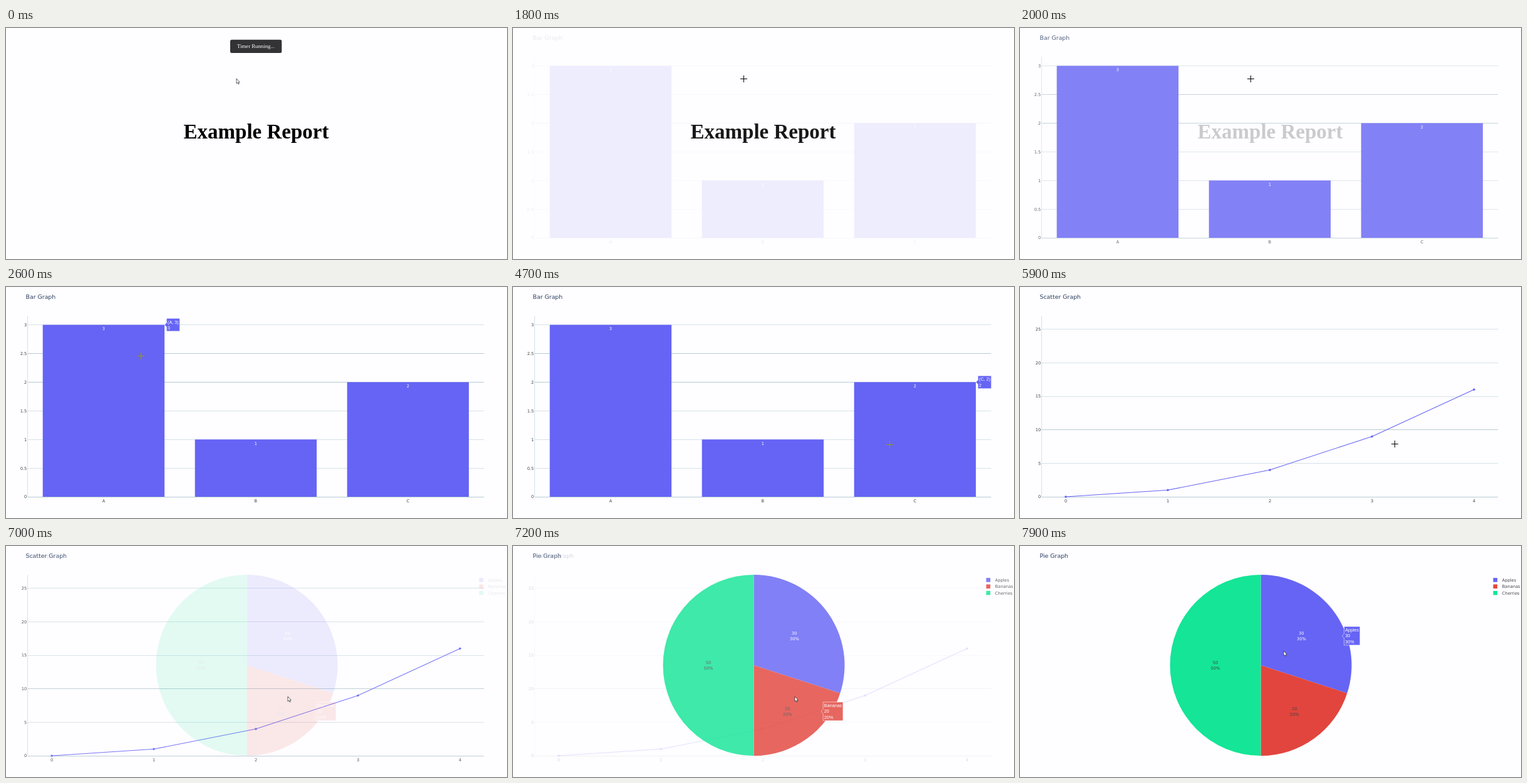
An HTML page for the animation above (8000 ms loop, 800 by 370 pixels).

```html
<!DOCTYPE html>
<html lang="en">
<head>
<meta charset="utf-8">
<title>Example Report</title>
<style>
  html, body { margin: 0; width: 100%; height: 100%; overflow: hidden; background: #fefdff; }
  svg { display: block; width: 100%; height: 100%; }
  .plot text { font: 6.65px "DejaVu Sans", sans-serif; fill: #444; }
  .plot .title { font-size: 9.4px; fill: #2a3f5f; }
  .plot .tip text { font: 7.2px Arial, "Liberation Sans", sans-serif; fill: #fff; }
  .tip path { stroke: #fff; stroke-width: .55; }
  .serif { font-family: "Liberation Serif", Times, serif; text-anchor: middle; }
  #cross { stroke: #fff; mix-blend-mode: difference; }
</style>
</head>
<body>
<svg viewBox="0 0 800 370">
  <rect width="800" height="370" fill="#fefdff"/>
  <g class="slide serif">
    <text x="399.5" y="177" font-size="33" font-weight="bold">Example Report</text>
  </g>
  <g class="slide plot"></g>
  <g class="slide plot"></g>
  <g class="slide plot"></g>
  <g id="timer" class="serif">
    <rect x="358" y="18.7" width="82.3" height="21.3" rx="2.5" fill="#333336"/>
    <text x="399" y="32.3" font-size="8.75" fill="#fff">Timer Running...</text>
  </g>
  <path id="arrow" d="M0 0V8L1.8 6.4L3 9L4.2 8.5L3.1 5.9H5.3Z" fill="#fff" stroke="#222" stroke-width=".7"/>
  <path id="cross" d="M-5.5 .5H5.5M0 -5V6" fill="none"/>
</svg>
<script>
const LOOP = 8000, FADE = 500;
const STARTS = [-FADE, 1750, 5345, 6945];
const BLUE = '#6664f4', RED = '#e2453d', GREEN = '#14e597';
const LEFT = 34.4, RIGHT = 763.4, TOP = 46, BASE = 336;
const CX = 384.5, CY = 191, R = 145;

// time, x, y
const PATH = [
  [0, 368, 81], [2200, 368, 81], [2550, 215, 110], [3150, 215, 110],
  [3650, 400, 290], [4050, 400, 290], [4600, 601, 252], [5850, 601, 252],
  [6150, 564, 241], [6500, 564, 241], [6800, 450, 241], [7350, 450, 241],
  [7800, 421, 168], [LOOP, 421, 168]
];

const bars = [['A', 3], ['B', 1], ['C', 2]].map(([name, v], i) => {
  const mid = LEFT + 243 * (i + .5);
  return { name, v, mid, x: mid - 97.2, y: BASE - 91.8 * v, w: 194.4 };
});

const points = [0, 1, 2, 3, 4].map(i => ({ i, x: 73 + 163 * i, y: BASE - 10.73 * i * i }));

let turn = 0;
const slices = [['Apples', 30, BLUE, '#fff'], ['Bananas', 20, RED, '#444'], ['Cherries', 50, GREEN, '#444']]
  .map(([name, v, color, ink]) => {
    const from = turn, to = turn += v / 100;
    const s = Math.sin(Math.PI * v / 100), inner = R * s / (1 + s);
    const [x, y] = onCircle((from + to) / 2, R - inner);
    return { name, v, color, ink, from, to, x, y, inner };
  });

function onCircle(part, r) {
  const a = part * 2 * Math.PI;
  return [CX + r * Math.sin(a), CY - r * Math.cos(a)];
}

const text = (s, x, y, anchor = 'middle', more = '') =>
  `<text x="${x}" y="${y}" text-anchor="${anchor}" ${more}>${s}</text>`;
const title = s => text(s, 31.5, 18.8, 'start', 'class="title"');
const line = (d, strong) => `<path d="${d}" stroke="${strong ? '#b7ccd6' : '#d5e3ea'}"/>`;

function axes(step, count, unit, strong) {
  let out = line(`M34.5 ${TOP}V${BASE}`);
  for (let i = 0; i <= count; i++) {
    const y = BASE - unit * step * i;
    out += line(`M${LEFT} ${Math.floor(y) + .5}H${RIGHT}`, strong.includes(i))
      + text(step * i, 33.2, y + 2.4, 'end');
  }
  return out;
}

function barPlot() {
  return title('Bar Graph') + axes(.5, 6, 91.8, [0, 4, 5]) + bars.map(b =>
    `<rect x="${b.x}" y="${b.y}" width="${b.w}" height="${BASE - b.y}" fill="${BLUE}"/>`
    + text(b.v, b.mid, b.y + 8.8, 'middle', 'style="fill:#fff"')
    + text(b.name, b.mid, 344.6)).join('');
}

function scatterPlot() {
  return title('Scatter Graph') + axes(5, 5, 10.73, [0, 2])
    + `<polyline points="${points.map(p => p.x + ',' + p.y).join(' ')}" fill="none" stroke="${BLUE}" stroke-width="1.1"/>`
    + points.map(p => `<circle cx="${p.x}" cy="${p.y}" r="1.8" fill="${BLUE}"/>` + text(p.i, p.x, 344.6)).join('');
}

function piePlot() {
  return title('Pie Graph') + slices.map((s, i) => {
    const ink = `style="fill:${s.ink}"`, y = 54.4 + 10.4 * i;
    return `<path d="M${CX} ${CY}L${onCircle(s.from, R)}A${R} ${R} 0 0 1 ${onCircle(s.to, R)}Z" fill="${s.color}"/>`
      + text(s.v, s.x, s.y - 2, 'middle', ink) + text(s.v + '%', s.x, s.y + 6.8, 'middle', ink)
      + `<rect x="755.6" y="${y - 3.3}" width="6.6" height="6.6" fill="${s.color}"/>`
      + text(s.name, 769.8, y + 2.5, 'start');
  }).join('');
}

// Tooltip contents for the pointer position, one rule per slide
const hovers = [
  () => null,
  (x, y) => {
    const b = bars.find(b => x > b.x && x < b.x + b.w && y > b.y && y < BASE);
    return b && { x: b.x + b.w, y: b.y, color: BLUE, lines: [`(${b.name}, ${b.v})`, b.v] };
  },
  (x, y) => {
    const p = points.find(p => Math.hypot(p.x - x, p.y - y) < 11);
    return p && { x: p.x + 2, y: p.y, color: BLUE, lines: [`(${p.i}, ${p.i * p.i})`] };
  },
  (x, y) => {
    if (Math.hypot(x - CX, y - CY) > R) return null;
    const part = (Math.atan2(x - CX, CY - y) / (2 * Math.PI) + 1) % 1;
    const s = slices.find(s => part < s.to);
    return { x: s.x + s.inner, y: s.y, color: s.color, lines: [s.name, s.v, s.v + '%'] };
  }
];

const slides = [...document.querySelectorAll('.slide')];
[barPlot, scatterPlot, piePlot].forEach((plot, i) => slides[i + 1].innerHTML = plot());
const tips = slides.map(s => {
  const g = document.createElementNS('http://www.w3.org/2000/svg', 'g');
  g.setAttribute('class', 'tip');
  return s.appendChild(g);
});
const timer = document.getElementById('timer');
const arrow = document.getElementById('arrow');
const cross = document.getElementById('cross');
const pen = document.createElement('canvas').getContext('2d');
pen.font = '7.2px Arial, "Liberation Sans", sans-serif';

function tooltip(h) {
  if (!h) return '';
  const w = Math.max(...h.lines.map(s => pen.measureText(s).width)) + 3.4;
  const n = h.lines.length, half = n * 4.68 + .9;
  return `<path d="M${h.x} ${h.y}l3.3 -3.3v${3.3 - half}h${w}v${2 * half}h${-w}v${3.3 - half}Z" fill="${h.color}"/>`
    + h.lines.map((s, i) => text(s, h.x + 5, h.y + (i - (n - 1) / 2) * 9.36 + 2.6, 'start')).join('');
}

const clamp = v => Math.min(1, Math.max(0, v));

// The standard CSS "ease" curve
function ease(x) {
  let lo = 0, hi = 1, s;
  for (let i = 0; i < 20; i++) {
    s = (lo + hi) / 2;
    if (.75 * s * (1 - s) + s ** 3 < x) lo = s; else hi = s;
  }
  return .3 * s * (1 - s) ** 2 + 3 * s * s * (1 - s) + s ** 3;
}

function pointer(t) {
  const i = PATH.findIndex(p => p[0] > t);
  const [t0, x0, y0] = PATH[i - 1], [t1, x1, y1] = PATH[i];
  let k = (t - t0) / (t1 - t0);
  k = k * k * (3 - 2 * k);
  return [x0 + (x1 - x0) * k, y0 + (y1 - y0) * k];
}

function draw(now) {
  const t = now % LOOP;
  const [x, y] = pointer(t);
  const active = STARTS.filter(s => s <= t).length - 1;
  const shown = ease(clamp((t - STARTS[active]) / FADE));
  slides.forEach((s, i) => {
    s.style.opacity = i === active ? shown : i === active - 1 ? 1 - shown : 0;
    tips[i].innerHTML = i === active ? tooltip(hovers[i](x, y)) : '';
  });
  timer.style.opacity = 1 - clamp((t - 700) / 600);

  const overPlot = (active === 1 || active === 2) && x > LEFT && x < RIGHT && y > TOP && y < BASE;
  arrow.style.display = overPlot ? 'none' : '';
  cross.style.display = overPlot ? '' : 'none';
  arrow.setAttribute('transform', `translate(${x} ${y})`);
  cross.setAttribute('transform', `translate(${Math.floor(x) + .5} ${Math.floor(y)})`);
  requestAnimationFrame(draw);
}
requestAnimationFrame(draw);
</script>
</body>
</html>
```
